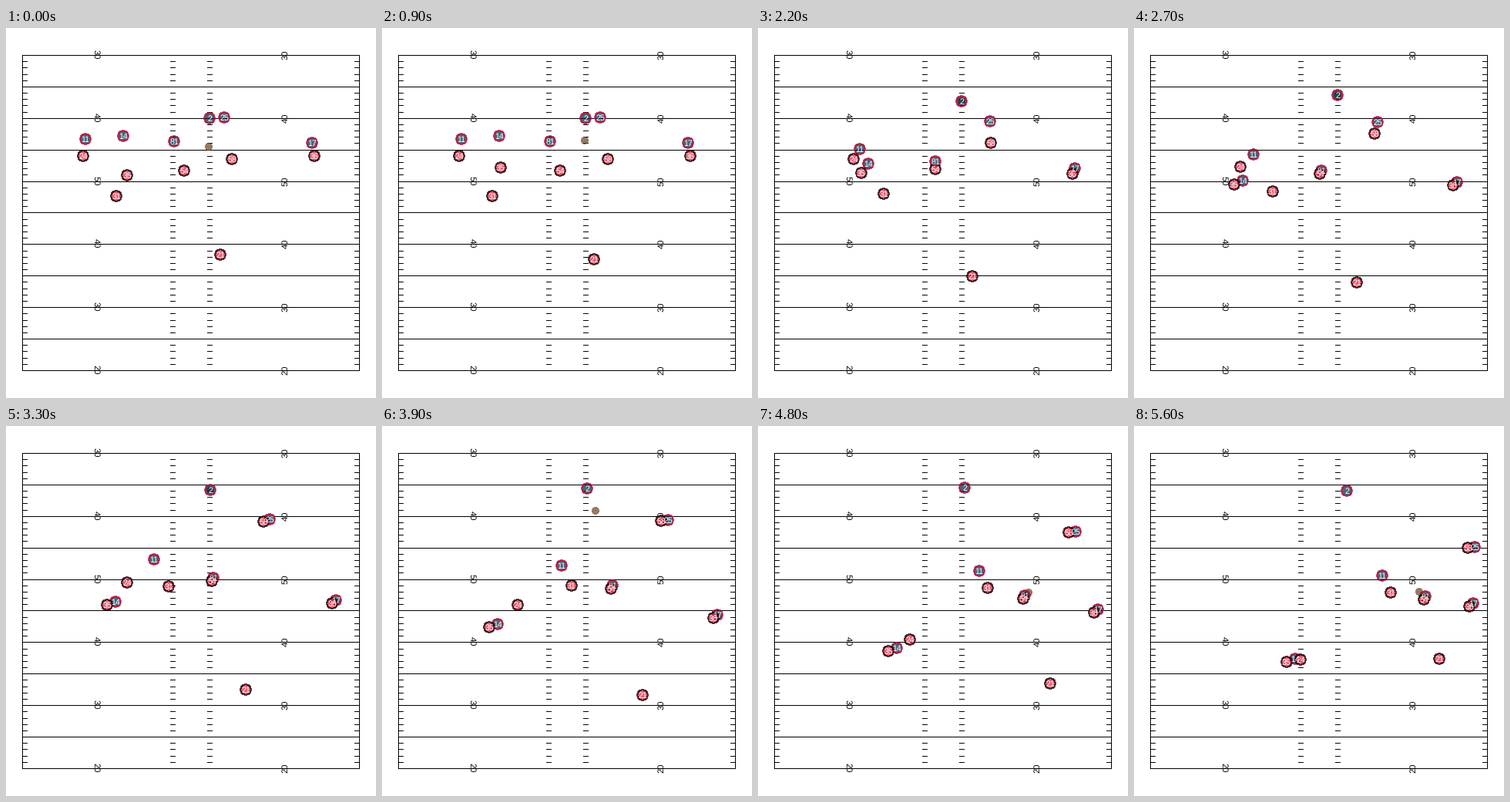
A matplotlib script for the animation above (5.7 s loop, 480 by 480 pixels).

```python
import numpy as np
import matplotlib.pyplot as plt
from matplotlib.animation import FuncAnimation
from matplotlib.collections import LineCollection
from matplotlib.patches import Circle

SIZE, DPI = 480, 80
PX = 72 / DPI                      # one pixel in points
FRAMES, INTERVAL = 57, 100
FRAME = np.arange(FRAMES)
FONT = "Liberation Sans"
ALPHA = 0.7
NAVY, CRIMSON, RED, BROWN = "#002244", "#c60c30", "#e31837", "#654321"
plt.rcParams["text.hinting"] = "none"

# Field geometry in pixels
LEFT, RIGHT, TOP, YARD = 21, 458, 34.97, 8.18
SNAP, CATCH, THROW, COMPLETE = 9, 13, 37, 48


def route(start, *points):
    """Smooth run through key points, at rest until the start frame."""
    t = np.array([start, 27, 39, COMPLETE, FRAMES - 1])
    p = np.array(points, float)
    m = np.gradient(p, t, axis=0, edge_order=2)
    m[0] = 0
    f = np.maximum(FRAME, start)
    k = np.clip(np.searchsorted(t, f, side="right") - 1, 0, len(t) - 2)
    h = (t[k + 1] - t[k])[:, None]
    s = (f - t[k])[:, None] / h
    return ((1 + 2 * s) * (1 - s) ** 2 * p[k] + s * (1 - s) ** 2 * h * m[k]
            + s * s * (3 - 2 * s) * p[k + 1] + s * s * (s - 1) * h * m[k + 1])


def cover(runner, cushion, tight, start, end):
    """Man coverage: the gap to the runner eases from cushion to tight."""
    s = np.clip((FRAME - start) / (end - start), 0, 1)[:, None]
    ease = s * s * (3 - 2 * s)
    return runner + np.array(cushion) * (1 - ease) + np.array(tight) * ease


def ball_route(passer):
    """Snapped, carried by the passer, thrown, caught."""
    (x0, y0), (x1, y1) = passer[CATCH], passer[THROW]
    t = [SNAP - 1, CATCH, THROW, THROW + 2, COMPLETE, FRAMES - 1]
    x = [263, x0, x1, 277, 351, 370]
    y = [154.4, y0, y1, 110, 216, 215]
    path = np.column_stack([np.interp(FRAME, t, x), np.interp(FRAME, t, y)])
    path[CATCH:THROW] = passer[CATCH:THROW]
    return path


offense = {
    25: route(SNAP, (283, 116), (316, 122), (371, 122), (412, 137), (442, 157)),
    14: route(SNAP, (152, 140), (141, 198), (150, 257), (180, 288), (209, 302)),
    11: route(SNAP, (103, 144), (155, 164), (233, 181), (287, 188), (322, 194)),
    17: route(SNAP, (397, 149), (419, 200), (435, 245), (441, 238), (440, 230)),
    81: route(SNAP, (218, 147), (243, 185), (299, 207), (346, 220), (378, 221)),
    2: route(SNAP, (264, 117), (264, 87), (266, 81), (268, 80), (276, 84)),
}
defense = {
    21: route(0, (278, 294), (289, 330), (338, 349), (379, 334), (396, 302)),
    24: route(SNAP, (100, 166), (138, 180), (176, 232), (197, 277), (216, 303)),
    35: cover(offense[14], (5, 51), (-11, 4), 0, 30),
    54: cover(offense[81], (13, 38), (-2, 4), SNAP, 27),
    58: cover(offense[25], (10, 54), (-9, 1), SNAP, 36),
    31: cover(offense[11], (40, 74), (11, 22), SNAP, 45),
    36: cover(offense[17], (3, 17), (-5, 4), SNAP, 28),
}


def draw_field(ax):
    row = lambda yard: round(TOP + YARD * yard)
    lines = [[(x, row(0)), (x, row(50))] for x in (LEFT, RIGHT)]
    for yard in range(51):
        y = row(yard)
        if yard % 5 == 0:
            lines.append([(LEFT, y), (RIGHT, y)])
        else:
            for x in (LEFT, 213, 261, RIGHT - 6):
                lines.append([(x, y), (x + 6, y)])
    ax.add_collection(LineCollection(lines, colors="black", linewidths=PX,
                                     antialiaseds=False, zorder=1))
    for i, label in enumerate((30, 40, 50, 40, 30, 20)):
        for x, angle, dy in ((113.4, 270, -0.7), (365.3, 90, 0.1)):
            ax.text(x, row(10 * i) + dy, str(label), rotation=angle,
                    rotation_mode="anchor", ha="center", va="baseline",
                    family=FONT, size=11.2 * PX, color="black", zorder=2)


fig = plt.figure(figsize=(SIZE / DPI, SIZE / DPI), dpi=DPI, facecolor="white")
ax = fig.add_axes([0, 0, 1, 1])
ax.set(xlim=(0, SIZE), ylim=(SIZE, 0))
ax.axis("off")
draw_field(ax)


def disc(radius, **style):
    return ax.add_patch(Circle((0, 0), radius, alpha=ALPHA, antialiased=False, **style))


ball_path = ball_route(offense[2])
ball = disc(4.5, fc=BROWN, lw=0, zorder=3)

players = []
for team, fill, edge, z in ((offense, NAVY, CRIMSON, 4), (defense, RED, "black", 5)):
    for number, path in team.items():
        dot = disc(6.7, fc=fill, ec=edge, lw=PX, zorder=z)
        label = ax.text(0, 0, str(number), color="white", family=FONT,
                        size=10.6 * PX, ha="center", va="baseline", zorder=6)
        players.append((path, dot, label))


def update(i):
    ball.center = tuple(np.round(ball_path[i]))
    for path, dot, label in players:
        x, y = np.round(path[i])
        dot.center = x, y
        label.set_position((x, y + 3.6))
    return []


anim = FuncAnimation(fig, update, frames=FRAMES, interval=INTERVAL,
                     init_func=lambda: update(0), repeat=True, repeat_delay=0)
plt.show()
```
